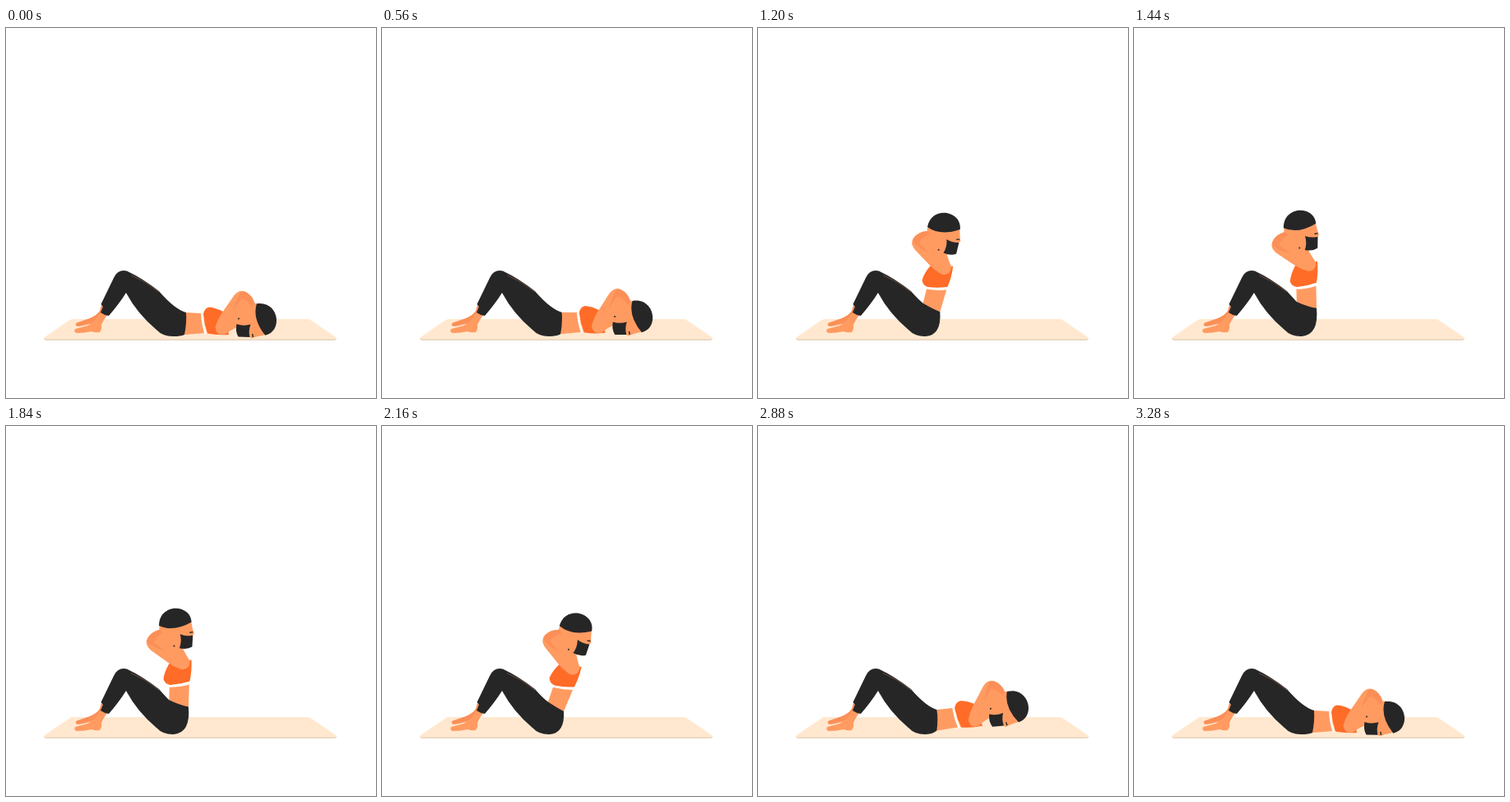
Animation, 450 px wide and 450 px high, one loop 3.68 s. Source, as an HTML page:

```html
<!DOCTYPE html>
<html lang="en">
<head>
<meta charset="utf-8">
<title>Sit-up</title>
<style>
  html, body { margin: 0; width: 100%; height: 100%; overflow: hidden; background: #fff; }
  svg { display: block; width: 100%; height: 100%; }
  .skin { fill: #ff9b61; }
  .shade { fill: #fb8f57; }
  .dark { fill: #262627; }
  .top { fill: #ff6c27; }
</style>
</head>
<body>
<svg viewBox="0 0 450 450">
  <!-- Mat -->
  <path fill="#e6d3bd" d="M46 377 H402 Q402 380 399 380 H49 Q46 380 46 377Z"/>
  <path fill="#ffe8cf" d="M81 354 H367 Q369 354 371 355.500 L401 376 Q402 378.500 400 378.500 H48 Q45 378.500 47 376 L77 355.500 Q79 354 81 354Z"/>

  <!-- Feet -->
  <path class="shade" d="M116 337 L123 343 Q119 351 113 355 Q102 361 87 363 Q83 361 86 358.500 L102 353 Q111 349 114 344Z"/>
  <path class="skin" d="M116 345 L124 348 Q118 356 116 361 Q117 367 114 370 Q109 371 104 369 Q96 371 86 371 Q82 370 84 366 L99 362 Q107 357 111 352Z"/>

  <path id="waist" class="skin"/>
  <path id="pants" class="dark"/>
  <path d="M152 300.500 Q170 308 186 321" fill="none" stroke="#9a6240" stroke-width=".6"/>

  <!-- Chest, arms and head, drawn sitting upright -->
  <g id="upper">
    <path class="top" d="M197 289 Q191 300 190.500 308 Q192 314 199 315 Q211 314 222.500 310 Q225 298 224 284Z"/>
    <path id="band" d="M198 316.800 Q211 316.500 223 312.500" fill="none" stroke="#fff" stroke-width="2"/>
    <g id="head">
      <path class="skin" d="M184 243 Q201 237 222 235 L224.500 246 L226.500 252 L223 256 L213 270 Q217 278 222 285 Q223 295 213 296 Q202 293 190 284 L174 273 Q166 266 170 259 Q174 251 184 248Z"/>
      <path class="shade" d="M170 259 Q174 251 184 248 L189 251 Q179 257 178 264 L192 274 Q183 272 174 267 Q168 264 170 259Z"/>
      <path class="dark" d="M209.500 253 Q217 256 225 254 L224.500 268 Q218 272 209 270 Q212 262 209.500 253Z"/>
      <path d="M221 250.800 L225 250" stroke="#262627" stroke-width="1.400"/>
      <circle class="dark" cx="202.500" cy="267.500" r="1"/>
      <path id="cap" class="dark" d="M183.500 243 C183 216 221 215 223 238 Q201 251 183.500 243Z"/>
    </g>
  </g>
</svg>
<script>
const LOOP = 3680, STEP = 80, REST = 3280;
const HIP = { x: 203, y: 352 };
const LYING = 90, UPRIGHT = -2;

const el = id => document.getElementById(id);
const mix = (a, b, k) => a + (b - a) * k;
const mixPoint = (a, b, k) => [mix(a[0], b[0], k), mix(a[1], b[1], k)];

function ease(time, start, end) {
  const u = Math.min(1, Math.max(0, (time - start) / (end - start)));
  return u < 0.5 ? 4 * u ** 3 : 1 - 4 * (1 - u) ** 3;
}

// Lean in degrees: a quick rise, then a slower way back down
function leanAt(time) {
  const raised = ease(time, 340, 1630) - ease(time, 1430, 3400);
  return mix(LYING, UPRIGHT, raised);
}

function turn([x, y], degrees) {
  const r = degrees * Math.PI / 180, c = Math.cos(r), s = Math.sin(r);
  const dx = x - HIP.x, dy = y - HIP.y;
  return [HIP.x + dx * c - dy * s, HIP.y + dx * s + dy * c];
}

function draw(time) {
  const lean = leanAt(Math.min(REST, Math.floor(time / STEP) * STEP));
  const k = lean / LYING;
  const crease = mixPoint([194, 329], [205, 342], k);
  const front = mixPoint([198, 333], [219, 346], k);
  const back = mixPoint([222, 341], [217, 373], k);
  const seat = mixPoint([225, 373], [212, 375], k);
  const bandFront = turn([198, 317], lean);
  const bandBack = turn([222, 313], lean);

  el('upper').setAttribute('transform', `rotate(${lean} ${HIP.x} ${HIP.y})`);
  el('head').setAttribute('transform', `translate(${2 * k} ${4.5 * k})`);
  el('cap').setAttribute('transform', `rotate(${-8 * k * k} 203 238)`);
  el('waist').setAttribute('d',
    `M${front} L${bandFront} L${bandBack} L${back} L205 364Z`);
  el('pants').setAttribute('d',
    `M115.500 336 L131 304 Q136 293 147 295.500 Q167 305 186 320 Q${crease} ${front}
     Q${mixPoint([211, 339], [220, 358], k)} ${back} Q${seat} 204 375
     Q191 375.500 183 367 Q160 348 146 322 Q138 335 125 350 Q119 349 115 346 L118 339Z`);
}

function tick(now) {
  draw(now % LOOP);
  requestAnimationFrame(tick);
}
draw(0);
requestAnimationFrame(tick);
</script>
</body>
</html>
```
